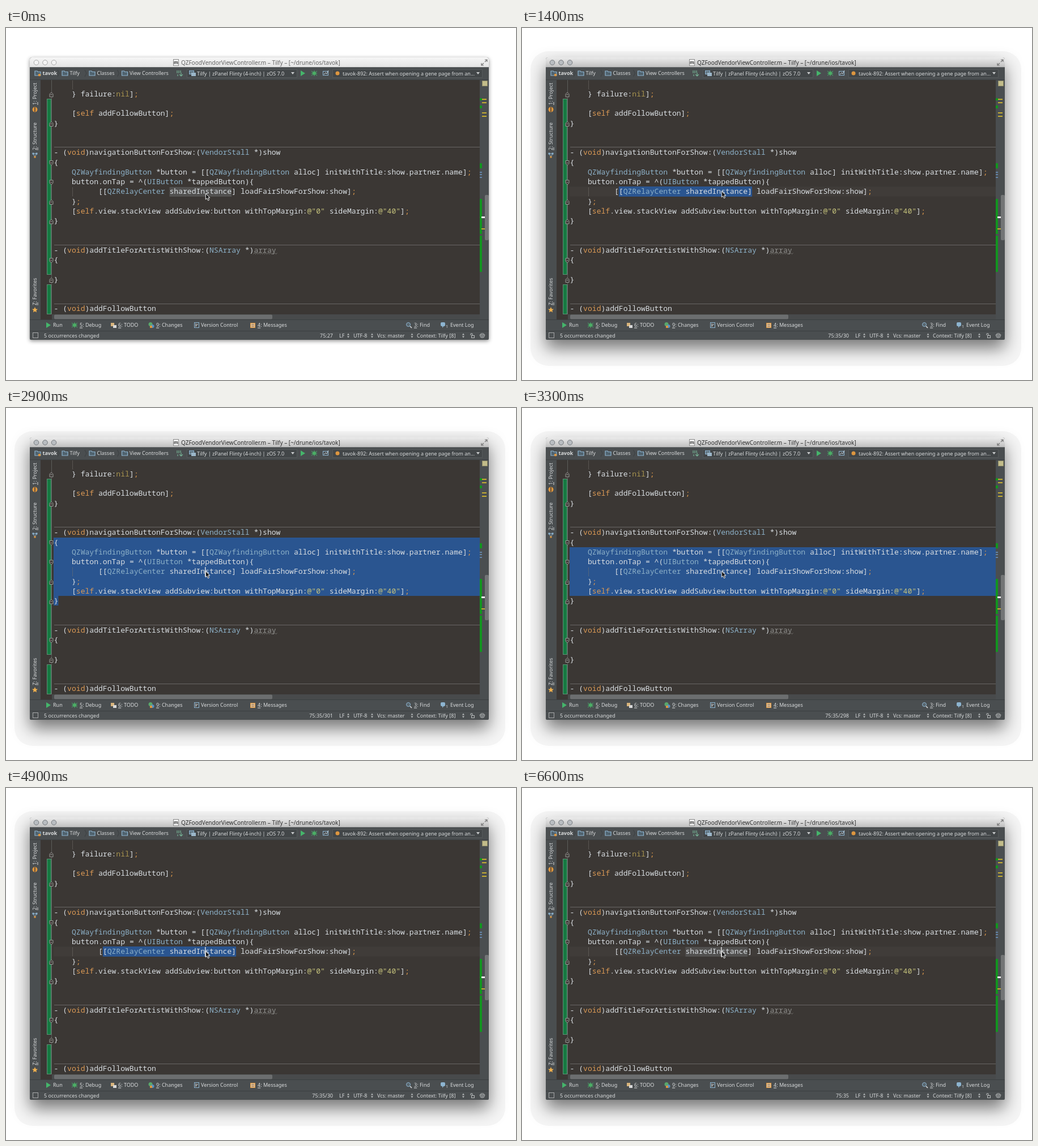
Animation, 900 px wide and 622 px high, one loop 6700 ms. Source, as an HTML page with a canvas:

```html
<!DOCTYPE html>
<html lang="en">
<head>
<meta charset="utf-8">
<title>Expanding selection</title>
<style>
  html, body { margin: 0; width: 100%; height: 100%; overflow: hidden; background: #fff; }
  canvas { display: block; }
</style>
</head>
<body>
<canvas id="stage" width="900" height="622"></canvas>
<script>
const ctx = document.getElementById('stage').getContext('2d');
const LOOP = 6700, COL = 7.84, ROW = 17.25, LEFT = 84.6, TOP = 107.9, EDGE = 836;
const UI = '"Noto Sans", "Open Sans", sans-serif';
const MONO = '500 13.07px "Noto Sans Mono", "DejaVu Sans Mono", monospace';
const PANEL = '#4a4e50', EDITOR = '#3b3734', BLUE = '#2a5590', PALE = '#d9dbdc';
const GREEN = '#45b56b', SKY = '#8db4d0', ORANGE = '#dd963f';

// Row number and text of each code line
const code = [
  [0, '    } failure:nil];'],
  [2, '    [self addFollowButton];'],
  [3, '}'],
  [6, '- (void)navigationButtonForShow:(VendorStall *)show'],
  [7, '{'],
  [8, '    QZWayfindingButton *button = [[QZWayfindingButton alloc] initWithTitle:show.partner.name];'],
  [9, '    button.onTap = ^(UIButton *tappedButton){'],
  [10, '          [[QZRelayCenter sharedInstance] loadFairShowForShow:show];'],
  [11, '    };'],
  [12, '    [self.view.stackView addSubview:button withTopMargin:@"0" sideMargin:@"40"];'],
  [13, '}'],
  [16, '- (void)addTitleForArtistWithShow:(NSArray *)array'],
  [17, '{'],
  [19, '}'],
  [22, '- (void)addFollowButton']
];
const syntax = /\b(void|self)\b|(;)|(nil)|(QZ\w+|UIButton|NSArray|VendorStall)|(@"\d+")|(\barray)|[^\s;@]+?(?=\b|\W)|\S/g;
const syntaxColors = ['#dc9a55', '#e09a4c', '#a9954f', '#8db1c8', '#c6c37c', '#8f8f8d'];

// Selected ranges: length, first row and column, last row and column
const ranges = {
  word: [14, 10, 26, 10, 40],
  call: [30, 10, 11, 10, 41],
  outer: [57, 10, 10, 10, 67],
  statement: [58, 10, 10, 10, 68],
  line: [69, 10, 0, 10, 999],
  block: [76, 9, 44, 11, 5],
  assign: [120, 9, 0, 11, 5],
  body: [298, 8, 0, 12, 999],
  method: [301, 7, 0, 13, 1]
};
const steps = [
  [0, ''], [900, 'word'], [1200, 'call'], [1600, 'outer'], [1700, 'statement'], [1900, 'line'],
  [2100, 'block'], [2200, 'assign'], [2500, 'body'], [2700, 'method'], [3300, 'body'],
  [3500, 'assign'], [3700, 'block'], [3800, 'line'], [4200, 'statement'], [4400, 'outer'],
  [4700, 'call'], [5300, 'word'], [5900, '']
];

const rowTop = n => TOP + ROW * n;
const colX = n => LEFT + COL * n;

function box(x, y, w, h, color) {
  ctx.fillStyle = color;
  ctx.fillRect(x, y, w, h);
}
function frame(x, y, w, h, color) {
  ctx.strokeStyle = color;
  ctx.strokeRect(x + .5, y + .5, w - 1, h - 1);
}
function round(x, y, w, h, r, color) {
  ctx.fillStyle = color;
  ctx.beginPath();
  ctx.roundRect(x, y, w, h, r);
  ctx.fill();
}
function path(x, y, d, fill, stroke, width = 1) {
  ctx.save();
  ctx.translate(x, y);
  const p = new Path2D(d);
  if (fill) { ctx.fillStyle = fill; ctx.fill(p); }
  if (stroke) { ctx.strokeStyle = stroke; ctx.lineWidth = width; ctx.stroke(p); }
  ctx.restore();
}
function dot(x, y, r, fill, stroke) {
  ctx.beginPath();
  ctx.arc(x, y, r, 0, 7);
  if (fill) { ctx.fillStyle = fill; ctx.fill(); }
  if (stroke) { ctx.strokeStyle = stroke; ctx.stroke(); }
}
function label(s, x, y, { color = PALE, font = '500 9px', align = 'left', key } = {}) {
  ctx.font = `${font} ${UI}`;
  ctx.textAlign = align;
  ctx.fillStyle = color;
  ctx.fillText(s, x, y + 3.3);
  if (key) ctx.fillRect(x, y + 4.5, ctx.measureText(s[0]).width, 1);
  ctx.textAlign = 'left';
}
function sideLabel(s, bottom) {
  ctx.save();
  ctx.translate(51, bottom);
  ctx.rotate(-Math.PI / 2);
  label(s, 0, 0, { key: true });
  ctx.restore();
}
const play = (x, y) => path(x, y, 'M-4-5L4 0L-4 5Z', GREEN);
const updown = (x, y) => path(x, y, 'M-2-1L0-4L2-1ZM-2 1L0 4L2 1Z', '#b9bcbd');
const dropdown = (x, y) => path(x, y, 'M-3-2H3L0 2Z', '#c9cbcc');
function bug(x, y) {
  path(x, y, 'M-5-4L5 4M5-4L-5 4M-5 0H5M0-5V5', null, GREEN);
  dot(x, y, 3, '#4cae65');
}
function folder(x, y) {
  path(x, y, 'M-5 4V-4H-1L0-2.5H5V4Z', '#50636f', SKY, 1.2);
}

function drawWindow(active) {
  box(0, 0, 900, 622, '#fff');
  if (active) round(15, 41, 866, 556, 32, '#f6f6f6');
  ctx.save();
  ctx.shadowColor = active ? 'rgba(0,0,0,.52)' : 'rgba(0,0,0,.45)';
  ctx.shadowBlur = active ? 30 : 7;
  ctx.shadowOffsetY = active ? 15 : 2;
  round(42, 52, 810, 499, [4, 4, 2, 2], PANEL);
  ctx.restore();

  const shade = ctx.createLinearGradient(0, 52, 0, 70);
  shade.addColorStop(0, active ? '#ebebeb' : '#f6f6f6');
  shade.addColorStop(1, active ? '#bdbdbd' : '#e3e3e3');
  round(42, 52, 810, 17, [4, 4, 0, 0], shade);
  for (const x of [53.5, 69, 84.5]) dot(x, 61, 4.3, active ? '#b9bdc1' : '#f4f4f4', active ? '#74787c' : '#a8a8a8');
  box(295.5, 55, 9, 12, '#fff');
  frame(295, 55, 10, 12, '#888');
  label('m', 300, 61, { font: 'bold 8px', color: '#333', align: 'center' });
  label('QZFoodVendorViewController.m – Tilfy – [~/drune/ios/tavok]', 309, 61.3,
    { font: '10px', color: active ? '#303030' : '#666' });
  path(844, 61, 'M1-1L5-5M1-5H5V-1M-1 1L-5 5M-5 1V5H-1', null, '#777', 1.2);
}

function drawToolbar() {
  box(42, 69, 810, 1, '#66696b');
  box(42, 91, 810, 1, '#3d4042');
  [[56, 'tavok'], [104, 'Tilfy'], [152, 'Classes'], [209.5, 'View Controllers']].forEach(([x, s], i) => {
    folder(x, 80);
    label(s, x + 8.5, 80, i ? {} : { font: 'bold 9px' });
    if (i) path(x - 11, 80, 'M-2-6L1 0L-2 6', null, '#3b3f41');
  });
  dot(59, 83, 2.3, ORANGE);
  path(306, 80, 'M-4-5V0M-1-5V0M2-5V-1M-3 2V5M3-1V5M0 2L3 5L6 2', null, '#75b294', 1.2);

  for (const [x, w] of [[319, 195], [576, 265]]) {
    round(x, 73, w, 15, 3, '#424648');
    frame(x, 73, w, 15, '#55595b');
  }
  box(324, 76, 8, 6, '#647885');
  frame(323, 75, 9, 7, SKY);
  box(327, 79, 8, 6, '#9bb6c9');
  label('Tilfy | zPanel Flinty (4-inch) | zOS 7.0', 337, 80.3);
  dropdown(506, 80);
  play(524, 80);
  bug(544, 80);
  frame(559, 76, 10, 8, SKY);
  path(564, 80, 'M-3 2L0-1L2 1L5-5', null, '#c9d9e4');
  dot(585, 80, 3.5, ORANGE);
  label('tavok-892: Assert when opening a gene page from an...', 594, 80.3);
  dropdown(833, 80);
}

function drawSidebar() {
  sideLabel('1: Project', 136);
  dot(51, 144, 4.5, ORANGE);
  box(50, 140, 2, 8, '#6b5135');
  sideLabel('2: Structure', 216);
  path(51, 225, 'M-3-3H3L0 3Z', null, SKY);
  for (const [x, y] of [[48, 222], [54, 222], [51, 228]]) box(x - 1.5, y - 1.5, 3, 3, y > 225 ? ORANGE : SKY);
  sideLabel('Z: Favorites', 490);
  path(51, 498, 'M0-5L1.5-1.6L5-1.3L2.3 1L3.1 4.5L0 2.6L-3.1 4.5L-2.3 1L-5-1.3L-1.5-1.6Z', '#efb04e');
}

function drawGutter() {
  for (const [y, h] of [[125, 311], [453, 53]]) {
    box(72, y, 8, h, '#167a42');
    frame(72, y, 8, h, '#5f8f76');
  }
  box(80, 92, 1, 414, '#5c5c5a');
  for (const n of [0, 3, 7, 9, 11, 13, 17, 19]) {
    const d = [7, 9, 17].includes(n) ? 'M-3-4H3V1L0 4L-3 1Z' : 'M-3 4H3V-1L0-4L-3-1Z';
    path(80, rowTop(n) + 9.8, d, EDITOR, '#a4a4a2', .9);
    box(78.5, rowTop(n) + 9.3, 3, 1, '#a4a4a2');
  }
}

function drawScrollbars() {
  box(EDGE, 92, 16, 423, PANEL);
  box(81, 506, 755, 9, '#484a4b');
  round(85, 506.5, 385, 8, 2, '#6c6e6f');
  round(845, 295, 7, 80, 2, '#737576');
  box(840, 93, 10, 10, '#c2bc8a');
  frame(840, 93, 10, 10, '#8f8b68');
  for (const y of [125, 131, 149, 155]) box(840, y, 8, 2, '#c4ac32');
  for (const [y, h] of [[124, 4], [137, 5], [239, 9], [302, 62], [367, 64]]) box(836, y, 4, h, '#12951f');
  for (const y of [254, 258, 263]) box(836, y, 4, 2, '#6484a8');
  box(839, 333, 6, 3, '#eee');
  box(839, 354, 6, 2, '#c4ac32');
}

function drawFooter(position) {
  box(42, 515, 810, 1, '#3b3f41');
  box(42, 535, 810, 1, '#3b3f41');
  play(75, 525);
  bug(121, 525);
  box(185, 521, 6, 6, '#d8b47c');
  box(189, 525, 6, 5, '#d7d7d7');
  dot(255, 523.5, 3.5, '#59a86c');
  dot(258.5, 527, 3, '#5791c4');
  box(254, 526, 4, 4, ORANGE);
  frame(332, 520, 9, 10, SKY);
  path(336, 525, 'M-1-3V3M-1 1L3-2', null, PALE);
  box(431, 521, 9, 9, '#e5c49b');
  frame(431, 521, 9, 9, ORANGE);
  path(435, 525, 'M-2-1H3M-2 2H3', null, '#7c6042');
  dot(710, 524, 3.5, '#58656d', SKY);
  path(713, 527, 'M0 0L3 3', null, PALE, 1.6);
  round(767, 520, 8, 7, 2, SKY);
  path(770, 526, 'M0 0V4L3 0Z', SKY);
  label('1', 776, 527, { font: '7px' });
  label('Run', 83, 525);
  label('Version Control', 344, 525);
  label('Event Log', 784, 525);
  for (const [s, x] of [['5: Debug', 130], ['6: TODO', 198], ['9: Changes', 265], ['4: Messages', 444], ['3: Find', 720]])
    label(s, x, 525, { key: true });

  frame(47, 538, 10, 10, '#a6a8a9');
  label('5 occurrences changed', 67, 543.3);
  label(position, 577, 543.3, { align: 'right' });
  for (const [s, x] of [['LF', 588], ['UTF-8', 613], ['Vcs: master', 655], ['Context: Tilfy [8]', 725]]) label(s, x, 543.3);
  for (const x of [604, 646, 716.5, 807]) updown(x, 543.5);
  frame(821, 543, 6, 5, '#b9bcbd');
  path(821, 543, 'M-1 0V-3H2V0', null, '#b9bcbd');
  dot(840.5, 543.5, 4, '#686c6e', '#a3a6a7');
  path(840.5, 543.5, 'M-5-1H5M-2 2H2', null, '#a3a6a7');
}

function drawCode() {
  ctx.font = MONO;
  for (const [row, line] of code)
    for (const m of line.matchAll(syntax)) {
      const kind = m.slice(1).findIndex(Boolean);
      ctx.fillStyle = kind < 0 ? '#d9dee2' : syntaxColors[kind];
      ctx.fillText(m[0], colX(m.index), rowTop(row) + 12.9);
    }
  let wave = 'M0 0';
  for (let x = 2; x <= 42; x += 2) wave += `L${x} ${x % 4 ? -2 : 0}`;
  path(436.5, 399.5, wave, null, '#85837f', .8);
}

function drawEditor(t, active, range) {
  box(61, 92, 775, 423, EDITOR);
  if (active) box(84, rowTop(10), EDGE - 84, ROW, '#403c39');
  if (range) {
    const [, r0, c0, r1, c1] = range;
    for (let r = r0; r <= r1; r++) {
      const x = r === r0 && c0 ? colX(c0) : 84;
      const end = r === r1 ? Math.min(EDGE, colX(c1)) : EDGE;
      const y = Math.round(rowTop(r));
      box(x, y, end - x, Math.round(rowTop(r + 1)) - y, BLUE);
    }
  } else box(colX(26), 281, COL * 14, 17, '#525150');
  for (const y of [210, 383, 487]) box(85, y, EDGE - 85, 1, '#686664');
  for (const [y, end] of [[93, 108], [282, 298]])
    for (let i = y; i < end; i += 2) box(117, i, 1, 1, '#77736f');
  drawCode();
  if (active && Math.floor(t / 500) % 2) box(351, 281, 1.4, 17, '#e4e4e4');
  drawGutter();
}

function draw(now) {
  const t = now % LOOP, active = t >= 100;
  const range = ranges[steps.findLast(s => s[0] <= t)[1]];
  ctx.lineWidth = 1;
  drawWindow(active);
  drawToolbar();
  drawSidebar();
  drawEditor(t, active, range);
  drawScrollbars();
  drawFooter(active ? '75:35' + (range ? '/' + range[0] : '') : '75:27');
  path(352.3, active ? 288.5 : 292.5, 'M0 0V10.5L2.4 8.3L4.2 12.3L6.2 11.4L4.4 7.5H7.6Z', '#151515', '#f2f2f2', 1);
}

let start;
function tick(now) {
  start ??= now;
  draw(now - start);
  requestAnimationFrame(tick);
}
requestAnimationFrame(tick);
</script>
</body>
</html>
```
